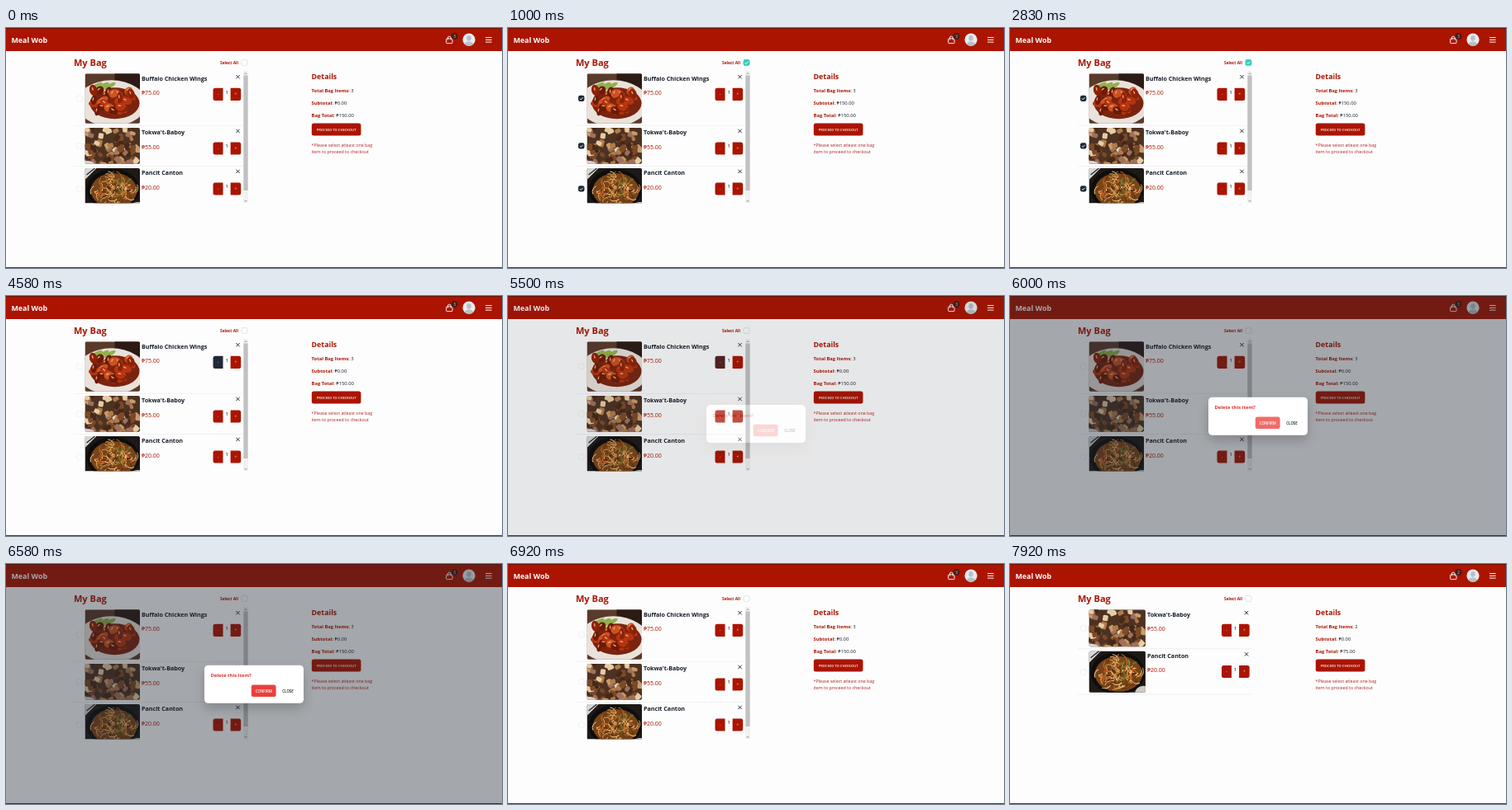
An HTML page with a canvas for the animation above (8 s loop, 600 by 291 pixels).

```html
<!DOCTYPE html>
<html lang="en">
<head>
<meta charset="utf-8">
<title>My Bag</title>
<style>
  html, body { margin: 0; width: 100%; height: 100%; overflow: hidden; background: #fdfdfd; }
  canvas { position: absolute; left: 0; top: 0; width: 600px; height: 291px; }
</style>
</head>
<body>
<canvas id="page"></canvas>
<canvas id="modal"></canvas>
<script>
const W = 600, H = 291, LOOP = 8000;
const FONT = '"Open Sans", "Noto Sans", sans-serif';
const RED_RGB = [171, 20, 0], NAVY_RGB = [31, 41, 55];
const RED = '#ab1400', NAVY = '#1f2937', INK = '#151c28', WHITE = '#fff';

function layer(id) {
  const el = document.getElementById(id);
  const dpr = window.devicePixelRatio || 1;
  el.width = W * dpr;
  el.height = H * dpr;
  const c = el.getContext('2d');
  c.scale(dpr, dpr);
  return c;
}
const page = layer('page'), modal = layer('modal');
let ctx = page;

const mix = (a, b, k) => `rgb(${a.map((v, i) => Math.round(v + (b[i] - v) * k)).join(',')})`;
function ease(t, from, ms) {
  const p = Math.min(1, Math.max(0, (t - from) / ms));
  return p * p * (3 - 2 * p);
}
function seeded(s) {
  return () => (s = (s * 16807) % 2147483647) / 2147483647;
}

function text(str, x, y, size, color, weight = 400, align = 'left') {
  ctx.font = `${weight} ${size}px ${FONT}`;
  ctx.fillStyle = color;
  ctx.textAlign = align;
  ctx.fillText(str, x, y);
  return ctx.measureText(str).width;
}
function box(x, y, w, h, r, color) {
  ctx.beginPath();
  ctx.roundRect(x, y, w, h, r);
  ctx.fillStyle = color;
  ctx.fill();
}
function oval(x, y, rx, ry, color, turn = 0) {
  ctx.beginPath();
  ctx.ellipse(x, y, rx, ry, turn, 0, 7);
  ctx.fillStyle = color;
  ctx.fill();
}
function line(color, width, ...pts) {
  ctx.beginPath();
  for (let i = 0; i < pts.length; i += 2) ctx.lineTo(pts[i], pts[i + 1]);
  ctx.strokeStyle = color;
  ctx.lineWidth = width;
  ctx.stroke();
}

// Photos are painted in a box 66.5 wide.
function wings() {
  box(0, 0, 67, 61, 0, '#5a3a2a');
  box(36, 0, 31, 18, 0, '#2c1a14');
  oval(32, 36, 42, 28, '#e9e2da');
  oval(36, 36, 30, 19, '#7a2410');
  for (let i = 0; i < 5; i++) oval(14 + i * 4, 15 + i % 2 * 4, 8, 2.5, i % 2 ? '#dfe3a0' : '#93b04c', -0.5);
  const r = seeded(31), tones = ['#b5340f', '#8a2208', '#cc5222', '#6b1a08'];
  for (let i = 0; i < 34; i++) {
    const x = 10 + r() * 48, y = 18 + r() * 29, a = r() * 3;
    oval(x, y, 5 + r() * 3, 3 + r() * 2, tones[i % 4], a);
    oval(x - 1, y - 1.5, 2.2, 0.8, '#f0a070', a);
  }
}
function pork() {
  box(0, 0, 67, 46, 0, '#4d3222');
  const r = seeded(77), tones = ['#c99d68', '#7c4a28', '#e6cda6', '#452818', '#a0705c', '#b07c48'];
  for (let i = 0; i < 75; i++) {
    ctx.save();
    ctx.translate(r() * 67, r() * 46);
    ctx.rotate(r() * 3);
    box(-3, -2.5, 5 + r() * 4, 4 + r() * 3, 1.5, tones[i % 6]);
    ctx.restore();
  }
  oval(2, 45, 10, 5, '#d8d2d0');
}
function noodles() {
  box(0, 0, 67, 51, 0, '#1d1917');
  ctx.beginPath();
  ctx.moveTo(0, 0);
  ctx.lineTo(14, 0);
  ctx.lineTo(0, 14);
  ctx.fillStyle = '#d8d6d4';
  ctx.fill();
  line('#222', 1.2, 2, 8, 12, 0);
  oval(64, 50, 10, 9, '#cfcac4');
  oval(34, 26, 32, 25, '#0f0d0c');
  oval(35, 27, 28, 21, '#7a4318');
  const r = seeded(19), tones = ['#e0aa5c', '#b8762c', '#f0cc8c', '#5f3312'];
  for (let i = 0; i < 110; i++) {
    const a = r() * 6.3, d = Math.sqrt(r()), turn = r() * 6.3;
    ctx.beginPath();
    ctx.arc(35 + 23 * d * Math.cos(a), 27 + 17 * d * Math.sin(a), 3 + r() * 5, turn, turn + 1.6);
    ctx.strokeStyle = tones[i % 4];
    ctx.lineWidth = 1;
    ctx.stroke();
  }
  for (let i = 0; i < 18; i++) {
    oval(14 + r() * 42, 13 + r() * 27, 3, 1, ['#5f7a30', '#d4561c', '#5a2812'][i % 3], r() * 3);
  }
}
function photo(paint, x, y, w, h) {
  ctx.save();
  ctx.beginPath();
  ctx.roundRect(x, y, w, h, 2);
  ctx.clip();
  ctx.translate(x, y);
  ctx.scale(w / 66.5, w / 66.5);
  paint();
  ctx.restore();
}

function checkbox(x, y, s, on, fill, border) {
  ctx.beginPath();
  ctx.roundRect(x + 0.3, y + 0.3, s - 0.6, s - 0.6, 2.4);
  ctx.strokeStyle = border;
  ctx.lineWidth = 0.6;
  ctx.stroke();
  if (!on) return;
  ctx.globalAlpha = on;
  box(x, y, s, s, 2.4, fill);
  line(WHITE, 0.9, x + s * 0.25, y + s * 0.52, x + s * 0.43, y + s * 0.7, x + s * 0.76, y + s * 0.34);
  ctx.globalAlpha = 1;
}

function header(count) {
  box(0, 0, W, 28, 0, RED);
  box(0, 0, W, 0.6, 0, '#2a0a06');
  text('Meal Wob', 6.5, 17.6, 8.9, WHITE, 700);
  ctx.beginPath();
  ctx.roundRect(532.6, 12.8, 7.4, 5.8, 0.8);
  ctx.moveTo(534.4, 14.6);
  ctx.lineTo(534.4, 12);
  ctx.arc(536.3, 12, 1.9, Math.PI, 0);
  ctx.lineTo(538.2, 14.6);
  ctx.strokeStyle = WHITE;
  ctx.lineWidth = 0.9;
  ctx.stroke();
  oval(542.5, 10, 3.9, 3.9, '#4a1a16');
  text(count, 542.5, 11.7, 4.6, '#e5d5d3', 400, 'center');

  ctx.save();
  ctx.beginPath();
  ctx.arc(560, 14.2, 7.6, 0, 7);
  ctx.clip();
  box(552, 6, 16, 17, 0, '#e9ebee');
  oval(560, 12.3, 2.8, 3.4, '#b9c0c8');
  oval(560, 21, 5.8, 4.6, '#b9c0c8');
  ctx.restore();
  for (let i = 0; i < 3; i++) line(WHITE, 1, 580, 11.5 + i * 2.8, 587.6, 11.5 + i * 2.8);
}

// Each row: name, price, photo, top, photo height, checkbox centre
const FULL = [
  ['Buffalo Chicken Wings', '₱75.00', wings, 55.3, 60.4, 85.5],
  ["Tokwa't-Baboy", '₱55.00', pork, 121, 43.7, 143],
  ['Pancit Canton', '₱20.00', noodles, 170, 49, 195]
];
const SHORT = [
  ["Tokwa't-Baboy", '₱55.00', pork, 55.3, 45, 78],
  ['Pancit Canton', '₱20.00', noodles, 105.5, 50.3, 131]
];

function row([name, price, paint, top, h, mid], wide, on, hover) {
  const dx = wide ? 5.5 : 0, left = wide ? 166 : 164;
  checkbox(85, mid - 3.8, 7.4, on, NAVY, '#e6e7e9');
  photo(paint, 95.5, top, wide ? 68.4 : 66.5, h);
  text(name, left, top + 8.4, 7.15, INK, 700);
  text(price, left, top + 25.9, 7, RED);

  const x = 280.5 + dx, y = top + 3.9;
  line(INK, 0.9, x - 2.2, y - 2.2, x + 2.2, y + 2.2);
  line(INK, 0.9, x - 2.2, y + 2.2, x + 2.2, y - 2.2);

  const by = top + 17.4;
  box(250.5 + dx, by, 12, 15.2, [2.5, 0, 0, 2.5], mix(RED_RGB, NAVY_RGB, hover));
  box(271.6 + dx, by, 12.6, 15.2, [0, 2.5, 2.5, 0], RED);
  text('-', 256.6 + dx, by + 9.2, 5, '#f1d9d6', 400, 'center');
  text('+', 278 + dx, by + 9.4, 5, '#f1d9d6', 400, 'center');
  text('1', 267 + dx, by + 6.9, 4.6, INK, 600, 'center');
}

function bag(removed, on, hover) {
  text('My Bag', 82, 46, 11, RED, 700);
  text('Select All', 259, 44, 4.85, RED, 700);
  checkbox(284.6, 38, 7.8, on, '#37cdbe', '#c3d8d8');

  ctx.save();
  ctx.beginPath();
  ctx.rect(80, 52, 215, 160.3);
  ctx.clip();
  for (const y of removed ? [102.7, 158] : [118.3, 167.5]) {
    line('#e8e8ea', 0.6, 82, y, removed ? 293 : 287, y);
  }
  (removed ? SHORT : FULL).forEach((item, i) => row(item, removed, on, i ? 0 : hover));
  if (!removed) {
    box(287, 52, 6, 161, 0, '#f1f1f1');
    box(287.4, 57.5, 5.2, 139.5, 0, '#c1c1c1');
    line('#666', 0.8, 288.8, 55.8, 290, 54.6, 291.2, 55.8);
    line('#666', 0.8, 288.8, 209.2, 290, 210.4, 291.2, 209.2);
  }
  ctx.restore();
}

function details(count, subtotal, total) {
  text('Details', 369.6, 62, 8.8, RED, 700);
  [['Total Bag Items:', count], ['Subtotal:', subtotal], ['Bag Total:', total]].forEach(([label, value], i) => {
    const y = 77.6 + i * 15;
    const w = text(label, 369.6, y, 5.8, RED, 700);
    text(value, 371.2 + w, y, 5.8, INK);
  });
  box(369.8, 115.5, 59.6, 15, 2.5, RED);
  text('PROCEED TO CHECKOUT', 399.6, 124.8, 4.1, WHITE, 600, 'center');
  text('*Please select atleast one bag', 369.6, 143.6, 5.3, '#b52020');
  text('item to proceed to checkout', 369.6, 152, 5.3, '#b52020');
}

function dialog(open, hover) {
  modal.canvas.style.opacity = open;
  modal.clearRect(0, 0, W, H);
  if (!open) return;
  ctx = modal;
  box(0, 0, W, H, 0, 'rgba(31,38,48,.4)');
  ctx.save();
  ctx.translate(0, 12.5 * (1 - open));
  ctx.shadowColor = 'rgba(0,0,0,.2)';
  ctx.shadowBlur = 14;
  ctx.shadowOffsetY = 6;
  box(240, 122.8, 120, 46, 4.5, WHITE);
  ctx.shadowColor = 'transparent';
  text('Delete this item?', 247.5, 137.2, 5.85, '#e02f2f', 700);
  box(296.8, 146.4, 29.8, 14.6, 2.5, mix([240, 108, 104], [232, 64, 62], hover));
  text('CONFIRM', 311.8, 155.5, 4.4, WHITE, 600, 'center');
  text('CLOSE', 341, 155.5, 4.4, INK, 600, 'center');
  ctx.restore();
}

function draw(t) {
  const on = ease(t, 50, 200) - ease(t, 2870, 200);
  const hover = ease(t, 4220, 240) - ease(t, 5400, 240);
  const open = ease(t, 5435, 200) - ease(t, 6670, 220);
  const removed = t >= 7000;
  const picked = t >= 80 && t < 2920;

  ctx = page;
  box(0, 0, W, H, 0, '#fdfdfd');
  header(removed ? '2' : '3');
  bag(removed, on, hover);
  details(removed ? '2' : '3', picked ? '₱150.00' : '₱0.00', removed ? '₱75.00' : '₱150.00');
  box(0, 290, W, 1, 0, '#3c3a3d');
  dialog(open, ease(t, 6130, 240));
}

const start = performance.now();
function tick() {
  draw((performance.now() - start) % LOOP);
  requestAnimationFrame(tick);
}
tick();
</script>
</body>
</html>
```
